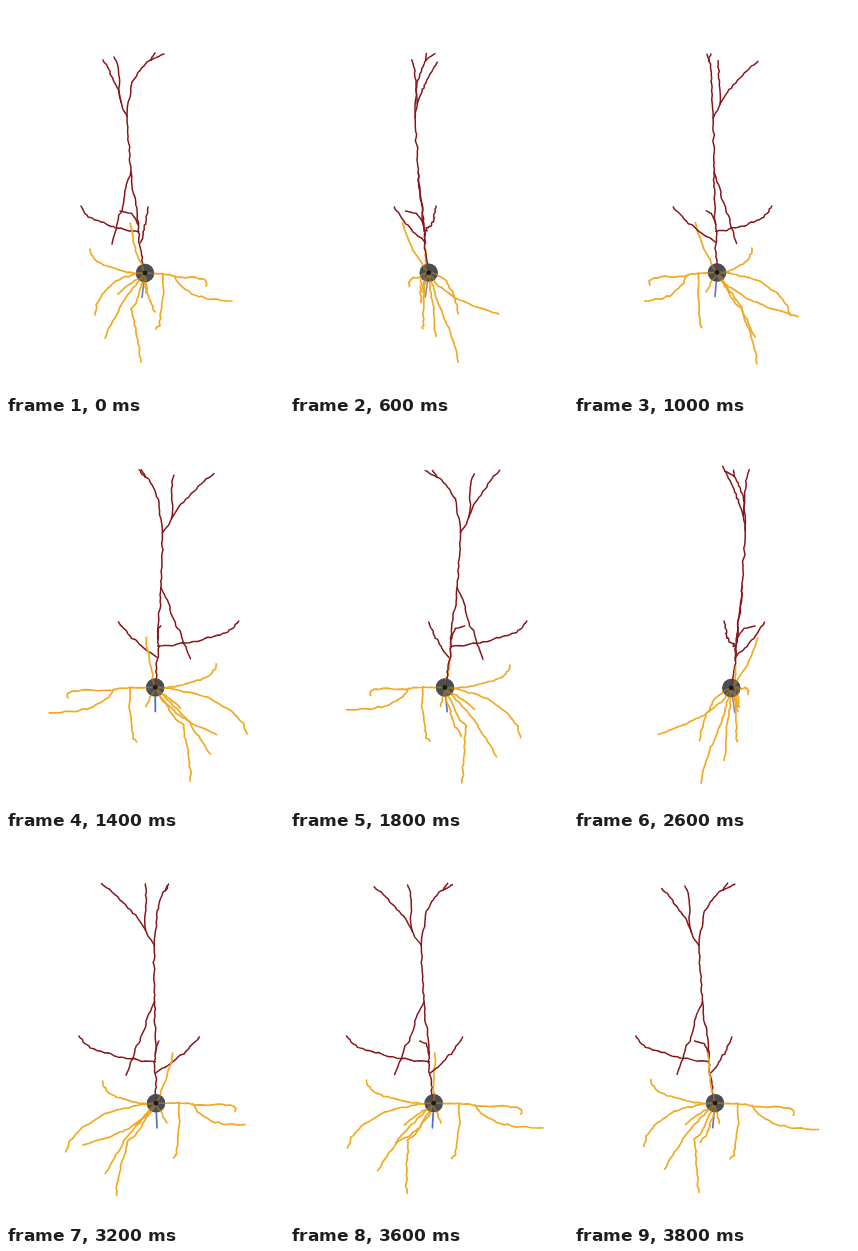
These frames come from a looping animation (278x387 px, 4000 ms). An HTML page with a canvas:

```html
<!DOCTYPE html>
<html lang="en">
<head>
<meta charset="utf-8">
<title>Rotating neuron</title>
<style>
html, body { margin: 0; width: 100%; height: 100%; overflow: hidden; background: #fff; }
canvas { display: block; width: 278px; height: 387px; }
</style>
</head>
<body>
<canvas id="stage"></canvas>
<script>
const W = 278, H = 387, CX = 148, CY = 200, DIST = 1750;
const STEP = 200, STEPS = 20;
const RED = '#86161a', ORANGE = '#f2a822';
const canvas = document.getElementById('stage');
const ctx = canvas.getContext('2d');
const ratio = window.devicePixelRatio || 1;
canvas.width = W * ratio;
canvas.height = H * ratio;
ctx.scale(ratio, ratio);
ctx.lineCap = ctx.lineJoin = 'round';

let seed = 11;
function noise() {
  seed = (seed * 16807) % 2147483647;
  return seed / 2147483647 - 0.5;
}

// A point given by its front-view position and depth (positive is farther).
function at(x, y, z) {
  const k = 1 + z / DIST;
  return { x: (x - CX) * k, y: (y - CY) * k, z };
}

function project(p, a) {
  const c = Math.cos(a), s = Math.sin(a);
  const z = p.z * c - p.x * s;
  const k = DIST / (DIST + z);
  return { x: CX + (p.x * c + p.z * s) * k, y: CY + p.y * k, z };
}

const lerp = (a, b, t) => a + (b - a) * t;
const between = (p, q, h, v = h) =>
  ({ x: lerp(p.x, q.x, h), y: lerp(p.y, q.y, v), z: lerp(p.z, q.z, h) });

// Grow a wandering curve to the tip; bend > 0 spreads sideways first,
// bend < 0 runs vertically first. Returns the tip, to grow on from it.
const branches = [];
function grow(color, from, tip, bend = 0) {
  const length = Math.hypot(tip.x - from.x, tip.y - from.y, tip.z - from.z);
  const n = Math.ceil(length / 3.5);
  const drift = { x: 0, y: 0, z: 0 };
  const points = [];
  for (let i = 0; i <= n; i++) {
    const t = i / n, mid = 2 * t * (1 - t);
    const p = between(from, tip, mid * (0.5 + bend) + t * t, mid * (0.5 - bend) + t * t);
    const fade = Math.min(1, i / 2, (n - i) / 2);
    for (const axis in drift) {
      drift[axis] = drift[axis] * 0.55 + noise() * 1.9;
      p[axis] += drift[axis] * fade;
    }
    points.push(p);
  }
  branches.push({ color, points });
  return tip;
}

const soma = at(139, 267, -5);

// Apical trunk and tuft
const lowFork = grow(RED, soma, at(125, 166, -8), 0.05);
const fork = grow(RED, lowFork, at(121, 110, -9));
const tuft = grow(RED, fork, at(115, 96, -2));
grow(RED, tuft, at(97, 54, 37), -0.1);
grow(RED, tuft, at(108, 51, -4), -0.15);
const rightTuft = grow(RED, fork, at(145, 54, -13), -0.35);
grow(RED, rightTuft, at(149, 47, -15));
grow(RED, rightTuft, at(158, 48, -11));

// Oblique branches
const onTrunk = t => between(soma, lowFork, t + 0.03, t);
grow(RED, onTrunk(0.41), at(75, 200, 52), 0.32);
grow(RED, lowFork, at(106, 238, 15));
grow(RED, onTrunk(0.48), at(114, 205, -16), -0.4);
grow(RED, onTrunk(0.3), at(142, 201, -49), 0.1);

// Basal dendrites
grow(ORANGE, soma, at(124, 217, -27), 0.15);
grow(ORANGE, soma, at(84, 243, 31), 0.45);
const hub = grow(ORANGE, soma, at(169, 271, -36), 0.4);
grow(ORANGE, hub, at(200, 280, -70), 0.7);
grow(ORANGE, hub, at(226, 295, -74), -0.4);
grow(ORANGE, between(soma, hub, 0.6, 0.3), at(150, 323, -20), -0.5);
grow(ORANGE, soma, at(89, 309, 71), 0.35);
grow(ORANGE, soma, at(99, 332, 34), 0.08);
const knee = grow(ORANGE, soma, at(125, 303, 20), -0.1);
grow(ORANGE, knee, at(135, 356, 35), 0.1);
grow(ORANGE, soma, at(149, 306, 76), -0.22);
grow(ORANGE, soma, at(112, 288, 7));
grow(ORANGE, soma, at(140, 287, -16));

const axon = [between(soma, at(136, 291.5, -7), 0.4), at(136, 291.5, -7)];

function trace(points, color, width) {
  ctx.strokeStyle = color;
  ctx.lineWidth = width;
  ctx.beginPath();
  points.forEach(p => ctx.lineTo(p.x, p.y));
  ctx.stroke();
}

function disc({ x, y }, r, color) {
  ctx.fillStyle = color;
  ctx.beginPath();
  ctx.arc(x, y, r, 0, Math.PI * 2);
  ctx.fill();
}

// The axon turns from grey to blue as the light catches it.
function axonColor(a) {
  const m = (1 + Math.cos(2 * (a - 2.27))) / 2;
  return `rgb(${lerp(140, 72, m)},${lerp(146, 104, m)},${lerp(162, 200, m)})`;
}

function draw(a) {
  ctx.fillStyle = '#fff';
  ctx.fillRect(0, 0, W, H);
  const body = project(soma, a);
  disc(body, 9.2, '#4c4e50');
  trace(axon.map(p => project(p, a)), axonColor(a), 1.7);
  branches
    .map(({ color, points }) => {
      const path = points.map(p => project(p, a));
      return { color, path, depth: path.reduce((sum, p) => sum + p.z, 0) / path.length };
    })
    .sort((p, q) => q.depth - p.depth)
    .forEach(({ color, path }) => trace(path, color, color === RED ? 1.5 : 1.7));
  // A translucent cell body lets the roots show through.
  disc(body, 9.2, 'rgba(76,78,80,0.65)');
  disc(body, 2.4, '#1c1a18');
}

const start = performance.now();
let shown = -1;
function tick() {
  const step = Math.floor((performance.now() - start) / STEP) % STEPS;
  if (step !== shown) {
    shown = step;
    draw(step * 2 * Math.PI / STEPS);
  }
  requestAnimationFrame(tick);
}
tick();
</script>
</body>
</html>
```
